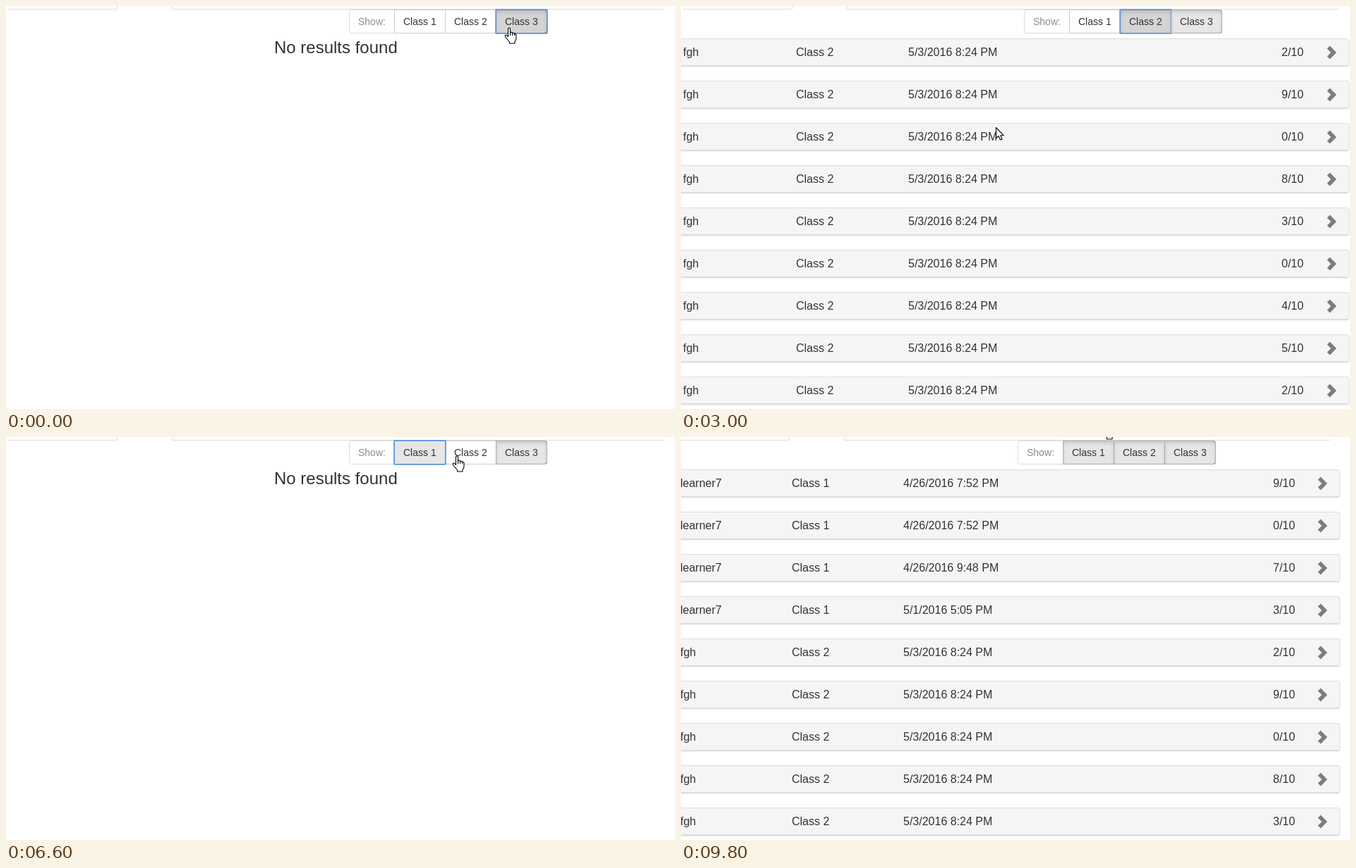
An HTML page with a canvas that plays this animation: 948x572 px, repeating every 10 s.

```html
<!DOCTYPE html>
<html lang="en">
<head>
<meta charset="utf-8">
<title>Class results filter</title>
<style>
  html, body { margin: 0; width: 100%; height: 100%; overflow: hidden; background: #fff; }
  canvas { display: block; width: 948px; height: 572px; }
</style>
</head>
<body>
<canvas id="stage" width="948" height="572"></canvas>
<script>
const ctx = document.getElementById('stage').getContext('2d');
const FONT = '"Liberation Sans", Arial, sans-serif';
const LOOP = 10000, STEP = 200, MAX_ROWS = 9;
const PITCH = 72, BUTTON_W = 73, BUTTON_H = 34, TOP = 5;

// Each move eases the pointer from its last place to (x, y)
const START = { x: 712, y: 30 };
const MOVES = [
  { from: 200, to: 800, x: 702, y: 140 },
  { from: 800, to: 1400, x: 673, y: 26 },
  { from: 2000, to: 3000, x: 446, y: 172 },
  { from: 3000, to: 3400, x: 446, y: 202 },
  { from: 3600, to: 4400, x: 662, y: 35 },
  { from: 4800, to: 5400, x: 592, y: 26 },
  { from: 6400, to: 6600, x: 638, y: 26 },
  { from: 7000, to: 7400, x: 599, y: 27 },
  { from: 8200, to: 8600, x: 602, y: -20 }
];

// The button takes focus when pressed and toggles when released
const CLICKS = [
  { button: 2, press: 1400, release: 1600 },
  { button: 2, press: 4800, release: 4800 },
  { button: 1, press: 5400, release: 5400 },
  { button: 1, press: 6600, release: 6600 },
  { button: 2, press: 7000, release: 7000 },
  { button: 1, press: 7800, release: 8200 }
];
const BLUR_AT = 9800;

const result = (user, group, date, score) => ({ user, group, date, score });
const RESULTS = [
  result('learner7', 1, '4/26/2016 7:52 PM', 9),
  result('learner7', 1, '4/26/2016 7:52 PM', 0),
  result('learner7', 1, '4/26/2016 9:48 PM', 7),
  result('learner7', 1, '5/1/2016 5:05 PM', 3),
  ...[...'290830452'].map(score => result('fgh', 2, '5/3/2016 8:24 PM', score))
];

const WIDE = { tabs: 2, group: 486, user: 3, cls: 163, date: 322, score: 851, right: 947 };
const NARROW = { tabs: -2, group: 477, user: -1, cls: 157, date: 315, score: 839, right: 934 };

const HAND = new Path2D('M5 13V2Q5 .5 6.5 .5T8 2V7Q10 6 11 8Q13 7 14 9Q16.5 8.5 16.5 11V15Q16.5 18 14.5 20V22.5H7V20.5Q4 17 1 13Q0 11 2 10.5Q3.5 10.5 5 13Z');
const KNUCKLES = new Path2D('M8 7V11.5M11 8V11.5M14 9V11.5');
const ARROW = new Path2D('M.5 .5V15.5L4 12.5L6.5 18L9 17L6.7 11.7H11.2Z');
const CHEVRON = new Path2D('M0 -5.5L4 -9.5L13.3 0L4 9.5L0 5.5L5.5 0Z');

function text(str, x, y, size, color = '#333') {
  ctx.font = size + 'px ' + FONT;
  ctx.fillStyle = color;
  ctx.fillText(str, x, y);
}

function box(x, y, w, h, radius, color) {
  ctx.beginPath();
  ctx.roundRect(x, y, w, h, radius);
  ctx.fillStyle = color;
  ctx.fill();
}

const inner = radius => radius.map(r => Math.max(0, r - 1));

function framed(x, y, w, h, radius, border, fill) {
  box(x, y, w, h, radius, border);
  box(x + 1, y + 1, w - 2, h - 2, inner(radius), fill);
}

const ease = k => (1 - Math.cos(Math.PI * k)) / 2;

function pointerAt(t) {
  let { x, y } = START;
  for (const m of MOVES) {
    const k = ease(Math.min(1, Math.max(0, (t - m.from) / (m.to - m.from))));
    x += (m.x - x) * k;
    y += (m.y - y) * k;
  }
  return { x: Math.round(x), y: Math.round(y) };
}

function stateAt(t) {
  const pressed = new Set([3]);
  let focus = 3;
  for (const c of CLICKS) {
    if (t >= c.press) focus = c.button;
    if (t >= c.release && !pressed.delete(c.button)) pressed.add(c.button);
  }
  if (t >= BLUR_AT) focus = 0;
  return { pressed, focus, rows: RESULTS.filter(r => pressed.has(r.group)) };
}

const buttonX = (lay, n) => lay.group + 64 + (n - 1) * PITCH;

// Hover styling trails the pointer by one step
function hoveredButton(t, lay) {
  const { x, y } = pointerAt(Math.max(0, t - STEP));
  const inside = y >= TOP && y < TOP + BUTTON_H;
  return inside ? Math.floor((x - buttonX(lay, 1)) / PITCH) + 1 : 0;
}

function drawTabs(lay) {
  const x = lay.tabs, end = lay.right - 15;
  ctx.fillStyle = '#ddd';
  ctx.fillRect(x, 4, 156, 1);
  ctx.fillRect(x + 155, 0, 1, 5);
  ctx.fillRect(x + 233, 0, 1, 5);
  ctx.fillRect(x + 233, 4, end - x - 233, 1);
}

function insetShadow(x, y, w, h, radius) {
  ctx.save();
  ctx.beginPath();
  ctx.roundRect(x, y, w, h, radius);
  ctx.clip();
  ctx.shadowColor = 'rgba(0,0,0,.125)';
  ctx.shadowBlur = 5;
  ctx.shadowOffsetY = 3;
  ctx.beginPath();
  ctx.rect(x - 20, y - 20, w + 40, h + 40);
  ctx.roundRect(x, y, w, h, radius);
  ctx.fillStyle = '#000';
  ctx.fill('evenodd');
  ctx.restore();
}

function focusRing(x, covered) {
  ctx.save();
  ctx.beginPath();
  ctx.rect(x - 2, 0, BUTTON_W + (covered ? 2 : 4), 50);
  ctx.clip();
  ctx.beginPath();
  ctx.roundRect(x, TOP, BUTTON_W, BUTTON_H, 1.5);
  ctx.lineWidth = 2;
  ctx.strokeStyle = 'rgba(77,144,240,.7)';
  ctx.stroke();
  ctx.restore();
}

function drawButtons(lay, focus, pressed, hover) {
  framed(lay.group, TOP, 65, BUTTON_H, [4, 0, 0, 4], '#dedede', '#fff');
  text('Show:', lay.group + 13, 27, 14, '#8c8c8c');

  const buttons = [1, 2, 3].map(n => {
    const on = pressed.has(n), focused = focus === n, over = hover === n;
    return { n, on, focused, over, lifted: on || focused || over, x: buttonX(lay, n) };
  });
  // Raised buttons overlap the borders of their plain neighbours
  buttons.sort((a, b) => a.lifted - b.lifted || a.n - b.n);
  for (const { n, on, focused, over, lifted, x } of buttons) {
    const strong = on && (focused || over);
    const fill = strong ? '#d4d4d4' : lifted ? '#e6e6e6' : '#fff';
    const border = focused || strong ? '#8c8c8c' : lifted ? '#adadad' : '#ccc';
    const radius = n === 3 ? [0, 4, 4, 0] : [0, 0, 0, 0];
    framed(x, TOP, BUTTON_W, BUTTON_H, radius, border, fill);
    if (on) insetShadow(x + 1, TOP + 1, BUTTON_W - 2, BUTTON_H - 2, inner(radius));
    text('Class ' + n, x + 13, 27, 14);
  }
  if (focus) focusRing(buttonX(lay, focus), pressed.has(focus + 1));
}

function drawRow(item, i, lay) {
  const y = 46 + i * 60, base = y + 25;
  ctx.save();
  ctx.shadowColor = 'rgba(0,0,0,.05)';
  ctx.shadowBlur = 1;
  ctx.shadowOffsetY = 1;
  box(-20, y, lay.right + 20, 40, 4, '#ddd');
  ctx.restore();
  box(-19, y + 1, lay.right + 18, 37, [3, 3, 0, 0], '#f5f5f5');
  text(item.user, lay.user, base, 16);
  text('Class ' + item.group, lay.cls, base, 16);
  text(item.date, lay.date, base, 16);
  text(item.score + '/10', lay.score, base, 16);
  ctx.save();
  ctx.translate(lay.right - 31.5, y + 20);
  ctx.fillStyle = '#7d7d7d';
  ctx.fill(CHEVRON);
  ctx.restore();
}

function drawPointer({ x, y }) {
  const hand = y < TOP + BUTTON_H;
  const shape = hand ? HAND : ARROW;
  ctx.save();
  ctx.translate(hand ? x - 5.5 : x, hand ? y + 0.5 : y);
  ctx.lineWidth = 1.1;
  ctx.lineJoin = 'round';
  ctx.fillStyle = '#fff';
  ctx.strokeStyle = '#000';
  ctx.fill(shape);
  ctx.stroke(shape);
  if (hand) ctx.stroke(KNUCKLES);
  ctx.restore();
}

function draw(t) {
  const { pressed, focus, rows } = stateAt(t);
  // A long list brings in a scrollbar that narrows the page
  const lay = rows.length > MAX_ROWS ? NARROW : WIDE;
  ctx.fillStyle = '#fff';
  ctx.fillRect(0, 0, 948, 572);
  drawTabs(lay);
  drawButtons(lay, focus, pressed, hoveredButton(t, lay));
  rows.slice(0, MAX_ROWS).forEach((r, i) => drawRow(r, i, lay));
  if (!rows.length) text('No results found', 380, 67, 24);
  drawPointer(pointerAt(t));
}

const start = performance.now();
function tick() {
  const t = (performance.now() - start) % LOOP;
  draw(Math.floor(t / STEP) * STEP);
  requestAnimationFrame(tick);
}
tick();
</script>
</body>
</html>
```
